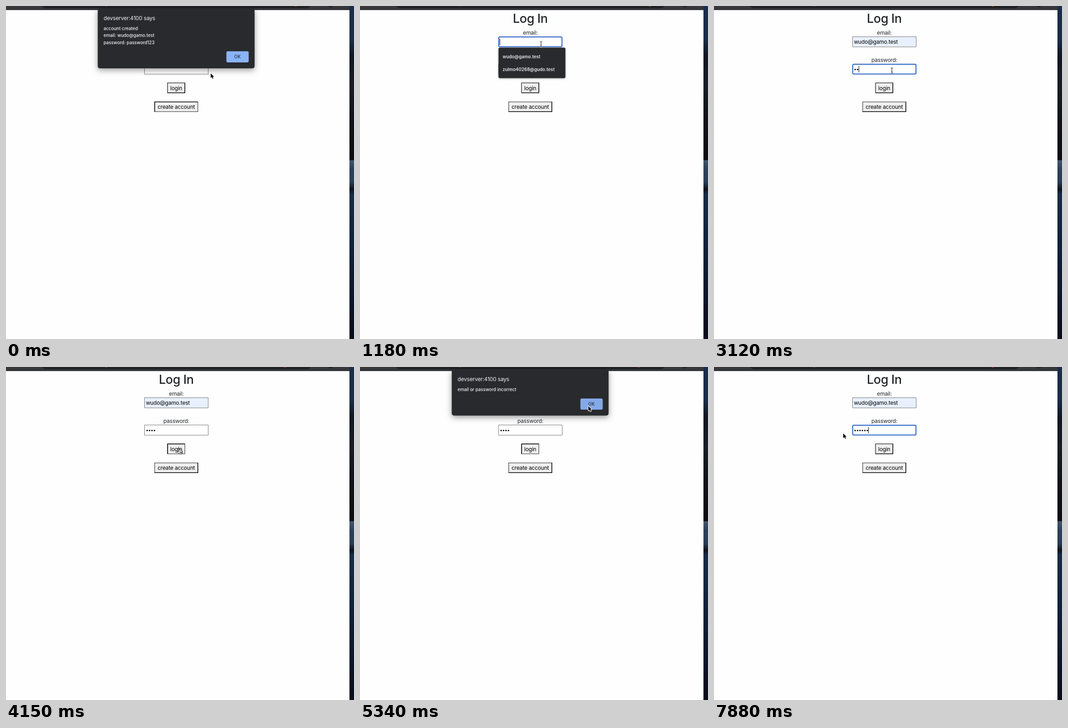
Write an HTML page with a canvas that moves like this. It is 765 by 732 pixels and loops after 8 s.

```html
<!DOCTYPE html>
<html lang="en">
<head>
<meta charset="utf-8">
<title>Log In</title>
<style>
  html, body { margin: 0; width: 100%; height: 100%; overflow: hidden; background: #fefefe; }
  canvas { display: block; }
</style>
</head>
<body>
<canvas id="stage" width="765" height="732"></canvas>
<script>
const ctx = document.getElementById('stage').getContext('2d');
const LOOP = 8000, TICK = 148.5;
const EMAIL = 'wudo@gamo.test', OTHER_EMAIL = 'zulmo40268@gudo.test';
const DARK = '#292a2d', INK = '#212529';

// Pointer path: tick, x, y, shape. Straight moves between keys, drawn once per tick.
const POINTER = [
  [0, 450, 148, 'arrow'], [3, 505, 108, 'arrow'], [5, 503, 109, 'arrow'],
  [6, 440, 92, 'beam'], [7, 398, 84, 'beam'], [8, 398, 84, 'beam'],
  [9, 390, 98, 'arrow'], [10, 375, 111, 'arrow'], [11, 376, 112, 'arrow'],
  [12, 386, 135, 'beam'], [13, 391, 142, 'beam'], [23, 391, 142, 'beam'],
  [25, 387, 162, 'arrow'], [26, 380, 178, 'hand'], [31, 380, 178, 'hand'],
  [32, 400, 160, 'arrow'], [35, 502, 86, 'arrow'], [36, 502, 86, 'arrow'],
  [37, 470, 103, 'arrow'], [38, 405, 133, 'beam'], [39, 350, 139, 'beam'],
  [40, 335, 140, 'beam'], [41, 306, 143, 'beam'], [42, 284, 146, 'arrow']
];

// Value of the last [tick, value] pair already reached.
const stepAt = (n, steps) => steps.filter(s => s[0] <= n).pop()[1];

function box(x, y, w, h, fill, radius = 0, stroke, line = 1) {
  ctx.beginPath();
  ctx.roundRect(x, y, w, h, radius);
  if (fill) { ctx.fillStyle = fill; ctx.fill(); }
  if (stroke) { ctx.strokeStyle = stroke; ctx.lineWidth = line; ctx.stroke(); }
}

function text(str, x, y, { size = 12, weight = 400, color = INK, align = 'left', spacing = -.2 } = {}) {
  ctx.font = `${weight} ${size}px Inter, sans-serif`;
  ctx.letterSpacing = spacing + 'px';
  ctx.textAlign = align;
  ctx.fillStyle = color;
  ctx.fillText(str, x, y);
}

function shadowed(blur, offset, alpha, draw) {
  ctx.save();
  ctx.shadowColor = `rgba(0,0,0,${alpha})`;
  ctx.shadowBlur = blur;
  ctx.shadowOffsetY = offset;
  draw();
  ctx.restore();
}

function drawDesktop() {
  box(0, 0, 765, 732, '#fefefe');
  const photo = ctx.createLinearGradient(0, 0, 0, 732);
  [[0, '#1b2d48'], [.1, '#1a2c47'], [.15, '#101722'], [.24, '#191d24'], [.34, '#101319'],
   [.462, '#0a0c11'], [.464, '#43566d'], [.49, '#2b405a'], [.53, '#2a3d56'], [.55, '#0e131c'],
   [.565, '#182b46'], [.75, '#0f1f38'], [1, '#060d1b']].forEach(s => photo.addColorStop(...s));
  box(755, 0, 10, 732, photo);
}

function drawToolbar(n) {
  box(0, 0, 755, 9, '#36373b');
  box(77, -20, 595, 25, '#202124', 12);
  box(706, -12, 15, 15, '#222326', 7.5);
  box(219, -1, 3, 1.5, '#8b8c8f');
  box(n < 21 ? 633 : 609, -7, 8, 8, '#d93a32', 4);
}

function drawField(y, focused, fill = '#fff') {
  if (focused) box(305, y + .9, 139, 21.6, fill, 2, '#2860c4', 2);
  else box(304.5, y + .5, 140, 22.4, fill, 0, '#767676');
}

function drawButton(label, x, y, w, pressed) {
  const h = 23, edge = 1.6;
  const [topLeft, bottomRight] = pressed ? ['#000', '#6b6b6b'] : ['#6b6b6b', '#000'];
  box(x, y, w, h, bottomRight);
  ctx.beginPath();
  ctx.moveTo(x, y);
  ctx.lineTo(x + w, y);
  ctx.lineTo(x + w - edge, y + edge);
  ctx.lineTo(x + edge, y + h - edge);
  ctx.lineTo(x, y + h);
  ctx.fillStyle = topLeft;
  ctx.fill();
  box(x + edge, y + edge, w - 2 * edge, h - 2 * edge, '#efefef');
  text(label, x + w / 2, y + 16, { align: 'center', color: '#000' });
}

function drawPassword(n, focused) {
  const dots = stepAt(n, [[0, 0], [21, 2], [22, 3], [23, 4], [47, 2], [49, 3], [50, 4], [52, 5], [53, 6]]);
  const pitch = 5.37, selected = n >= 41 && n < 47;
  drawField(127, focused);
  if (selected) box(307.5, 130, dots * pitch, 18, '#b4d5fe');
  ctx.fillStyle = '#000';
  for (let i = 0; i < dots; i++) {
    ctx.beginPath();
    ctx.arc(310.2 + i * pitch, 139.6, 1.65, 0, 7);
    ctx.fill();
  }
  const blinkedOff = n >= 18 && n < 21;
  if (focused && !selected && !blinkedOff) box(Math.round(307.2 + dots * pitch), 132, 1, 14, '#000');
}

function drawForm(n) {
  const center = { align: 'center' };
  const filled = n >= 10, emailFocus = n >= 8 && n < 14;
  const passwordFocus = (n >= 14 && n < 27) || n >= 40;
  text('Log In', 374.3, 36.5, { size: 27, weight: 500, align: 'center', spacing: -.4 });
  text('email:', 374.5, 62.5, center);
  drawField(67, emailFocus, filled ? '#e8f0fe' : '#fff');
  if (filled) text(EMAIL, 307.5, 83, { color: '#000' });
  else if (emailFocus) box(307, 72, 1, 14, '#000');
  text('password:', 374.5, 122.5, center);
  drawPassword(n, passwordFocus);
  drawButton('login', 354.5, 168.5, 39.5, n >= 27 && n < 38);
  drawButton('create account', 326, 210, 96.5, n < 6);
}

function drawSuggestions(n) {
  if (n < 8 || n > 10) return;
  shadowed(4, 1, .35, () => box(304.5, 91.5, 147, 67, DARK, 3));
  if (n === 10) box(304.5, 98, 147, 27, '#3f4043');
  const style = { size: 9.7, weight: 600, color: '#e8eaed', spacing: 0 };
  text(EMAIL, 313.5, 115, style);
  text(OTHER_EMAIL, 313.5, 142.5, style);
}

function drawDialog(lines, opacity, hover) {
  const bottom = 91.5 + lines.length * 15.2;
  const okTop = bottom - 37.5;
  ctx.save();
  ctx.globalAlpha = opacity;
  shadowed(13, 4, .4, () => box(201.7, 5.5, 344.8, bottom - 5.5, DARK, 5));
  text('devserver:4100 says', 214.5, 31, { color: '#f1f3f4' });
  const small = { size: 9.7, weight: 500, color: '#f1f3f4', spacing: 0 };
  lines.forEach((line, i) => text(line, 214.5, 52.7 + i * 15.4, small));
  box(484.5, okTop, 49, 24.5, hover ? '#84a9e8' : '#8ab4f8', 3);
  text('OK', 508.8, okTop + 15.7, { ...small, color: '#27303f', align: 'center' });
  ctx.restore();
}

function drawDialogs(n) {
  if (n < 6) drawDialog(['account created', 'email: ' + EMAIL, 'password: password123'], n === 5 ? .4 : 1, n >= 3);
  if (n >= 29 && n < 38) drawDialog(['email or password incorrect'], n === 29 || n === 37 ? .5 : 1, n >= 35);
}

const SHAPES = {
  arrow: new Path2D('M0 0V10.2L2.4 8L4.1 11.8L5.9 11L4.2 7.4H7.4Z'),
  beam: new Path2D('M-2.5-6Q0-6 0-4.5Q0-6 2.5-6M0-4.5V4.5M-2.5 6Q0 6 0 4.5Q0 6 2.5 6M-1.3 2H1.3'),
  hand: new Path2D('M-1.6 1Q-1.4-.6 0 0L1.7 5L3 4.2L4.3 5L5.6 4.7L6.5 6L7.3 6.2L7.6 10L6.4 13H1.2L-3 8.6Q-3.2 7 .2 7.5ZM2.6 8V11M4.3 8V11M6 8V11')
};

function drawPointer(n) {
  const at = POINTER.findLastIndex(key => key[0] <= n);
  const [t0, x0, y0, shape] = POINTER[at];
  const [t1, x1, y1] = POINTER[at + 1] || [t0 + 1, x0, y0];
  const k = Math.min(1, (n - t0) / (t1 - t0));
  ctx.save();
  ctx.translate(x0 + (x1 - x0) * k, y0 + (y1 - y0) * k);
  ctx.lineJoin = 'round';
  const path = SHAPES[shape];
  ctx.strokeStyle = shape === 'hand' ? '#000' : '#fff';
  ctx.lineWidth = shape === 'hand' ? 1 : 2;
  if (shape === 'hand') { ctx.fillStyle = '#fff'; ctx.fill(path); }
  ctx.stroke(path);
  if (shape === 'arrow') { ctx.fillStyle = '#000'; ctx.fill(path); }
  if (shape === 'beam') { ctx.strokeStyle = '#111'; ctx.lineWidth = 1; ctx.stroke(path); }
  ctx.restore();
}

function render() {
  const n = Math.min(53, Math.floor((performance.now() % LOOP + 20) / TICK));
  drawDesktop();
  drawToolbar(n);
  drawForm(n);
  drawSuggestions(n);
  drawDialogs(n);
  drawPointer(n);
  requestAnimationFrame(render);
}
render();
</script>
</body>
</html>
```
